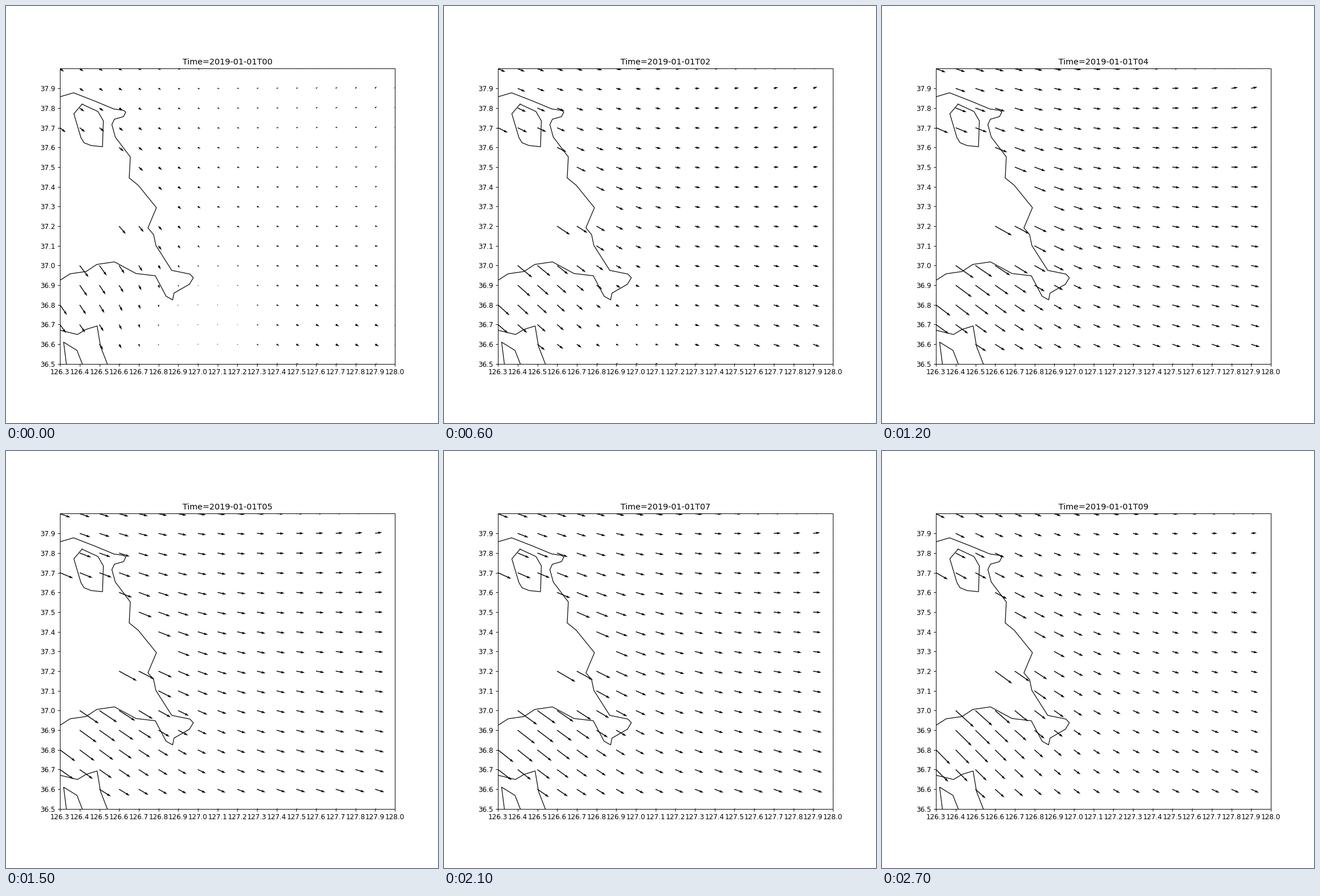
Animation of 761 by 735 pixels, one loop 3000 ms. Source, as a matplotlib script:

```python
import numpy as np
import matplotlib.pyplot as plt
from matplotlib.animation import FuncAnimation

W, H, DPI = 761, 735, 72  # at 72 dpi one point is one pixel
LON0, LON1, LAT0, LAT1 = 126.3, 128.0, 36.5, 38.0
HOURS, INTERVAL = 10, 300
LEFT, WIDTH, TOP = 0.125 * W, 0.775 * W, 110.48
PX_PER_DEG = WIDTH / (LON1 - LON0)
HEIGHT = PX_PER_DEG * (LAT1 - LAT0)

plt.rcParams.update({
    "font.family": "DejaVu Sans", "font.size": 12, "axes.titlesize": 14.4,
    "axes.titlepad": 7.2, "axes.linewidth": 0.96,
})

fig = plt.figure(figsize=(W / DPI, H / DPI), dpi=DPI, facecolor="white")
ax = fig.add_axes([LEFT / W, 1 - (TOP + HEIGHT) / H, WIDTH / W, HEIGHT / H])
ax.set_xlim(LON0, LON1)
ax.set_ylim(LAT0, LAT1)
ax.set_xticks(LON0 + 0.1 * np.arange(18))
ax.set_yticks(LAT0 + 0.1 * np.arange(15))
ax.xaxis.set_major_formatter("{x:.1f}")
ax.yaxis.set_major_formatter("{x:.1f}")
ax.tick_params(length=4.2, width=0.96, pad=4.2)
title = ax.set_title("")


def draw_coast(*points):
    """Line through stage pixels, clipped to the map."""
    x, y = np.array(points).T
    ax.plot(LON0 + (x - LEFT) / PX_PER_DEG, LAT1 - (y - TOP) / PX_PER_DEG,
            color="black", lw=1.2)


draw_coast((85, 163), (119, 153), (155, 167), (190, 181.5), (207, 184),
           (211, 187), (207, 195), (191, 199.5), (186.5, 209), (192.5, 231),
           (219, 266), (217, 303), (233, 316), (265, 355.5), (250, 391),
           (260, 403), (264, 422), (292, 466), (324, 472.5), (330, 479),
           (323, 490.5), (296, 506), (293.5, 518), (282, 511.5),
           (263, 475.5), (229, 471.5), (191, 451), (160, 455.5), (141, 468),
           (113, 472), (85, 490))
draw_coast((134, 173), (162, 186), (171.5, 202.5), (170, 248), (150, 246),
           (137.5, 241), (132, 232), (119.5, 190), (134, 173))
draw_coast((85, 569), (126, 579), (141, 570), (160.5, 564), (166.5, 600),
           (182, 640))
draw_coast((107.5, 640), (101.5, 592.5), (125, 607), (138, 640))

# Arrows stand every 0.1 degree, from the first column with data in each row
FIRST_COL = [0, 1, 1, 0, 3, 4, 5, 6, 3, 5, 1, 1, 0, 0, 2, 3]
col, row = np.array([(c, r) for r, first in enumerate(FIRST_COL)
                     for c in range(first, 18)]).T


def bell(x, center, width):
    return np.exp(-((x - center) / width) ** 2)


def wind(hour):
    """Arrow components in pixels: a daily breeze, a western jet, a lull."""
    breeze = 2.3 + 10 * np.sin(np.pi * hour / 12)
    growth = 1 - np.exp(-hour / 2.5)
    lull = 3.5 + 2.3 * (1 - np.tanh(3 * (hour - 2.5)))
    lull_shape = bell(col, 6.3, 4) * bell(row, 13.3, 4)
    northwest = (16 - col) * (14 - row)

    east_jet = (13 + 11 * growth) * (0.13 + 0.87 * bell(row, 8, 4.3))
    east = (breeze + 0.31 * row + 0.012 * northwest
            + east_jet * bell(col, 0, 3.7 + 1.8 * growth)
            - lull * lull_shape)

    south_jet = (18 + 6 * (hour / 9) ** 4) * bell(row, 9.5, 5.2)
    south = (0.28 * hour - 4 + 0.55 * row + 0.038 * northwest
             + south_jet * bell(col, 0, 4.6 + 0.7 * growth)
             - 0.9 * (lull - 3.5) * lull_shape)
    return east, -south


arrows = ax.quiver(LON0 + 0.1 * col, LAT1 - 0.1 * row, *wind(0),
                   units="dots", scale_units="dots", scale=1,
                   width=0.0024 * WIDTH, color="black")


def draw(hour):
    arrows.set_UVC(*wind(hour))
    title.set_text(f"Time=2019-01-01T{hour:02d}")
    return arrows, title


anim = FuncAnimation(fig, draw, frames=HOURS, interval=INTERVAL,
                     repeat=True, repeat_delay=0, blit=False)
plt.show()
```
